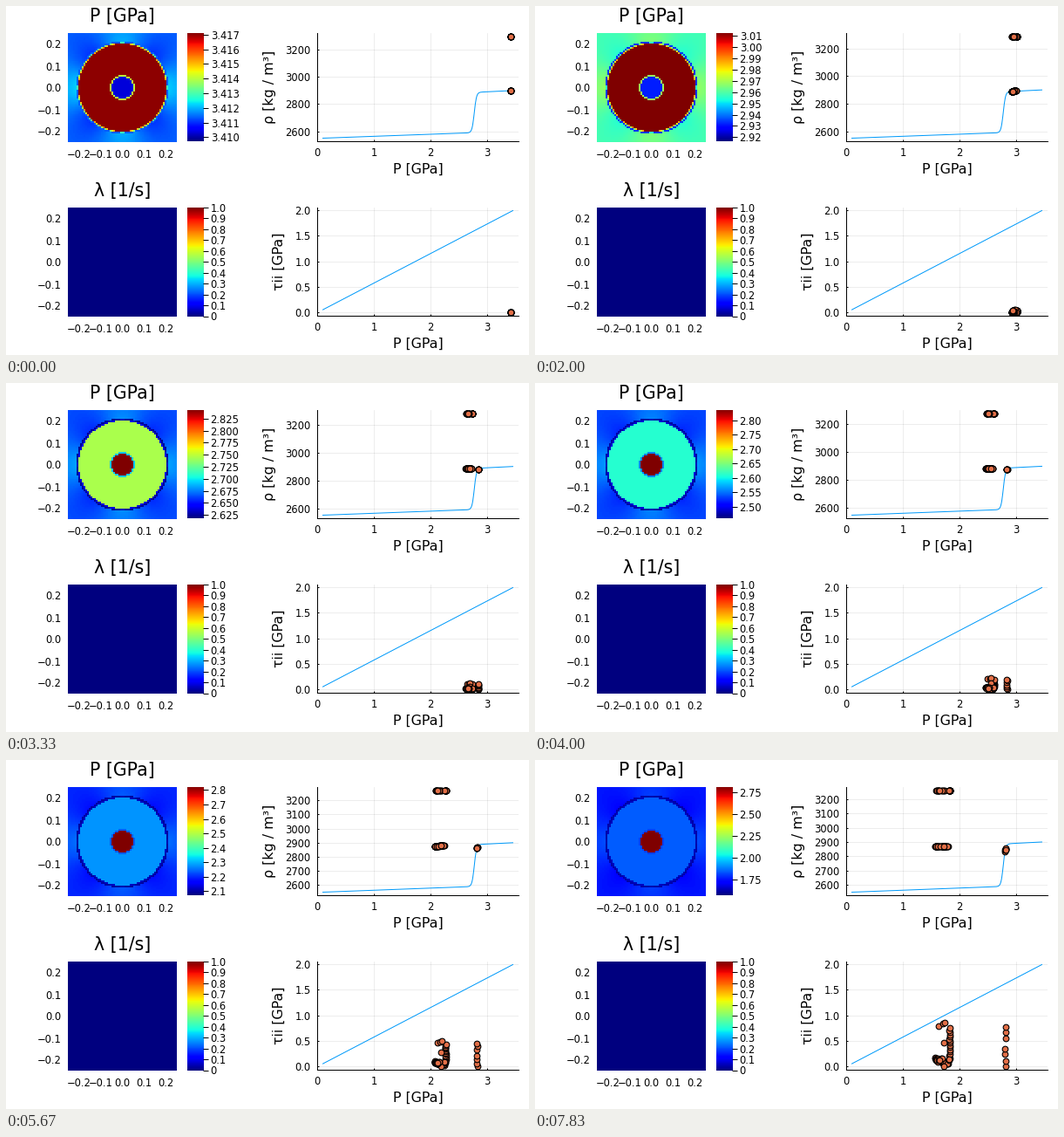
A matplotlib script for the animation above (8 s loop, 600 by 400 pixels).

```python
import numpy as np
import matplotlib.pyplot as plt
from matplotlib.animation import FuncAnimation

W, H, DPI = 600, 400, 100
STEPS, LOOP, INTERVAL = 48, 8000, 50
PX = 72 / DPI                      # points per pixel
TICK, GUIDE, TITLE = 8.3, 11.45, 14.8
BLUE, ORANGE = "#009afa", "#e36f47"

plt.rcParams["font.family"] = "DejaVu Sans"
fig = plt.figure(figsize=(W / DPI, H / DPI), dpi=DPI, facecolor="white")

# Pressure history in GPa at a few key steps
KEYS = [0, 5, 12, 20, 28, 34, 47]
FLOOR = [3.4097, 3.205, 2.916, 2.617, 2.300, 2.067, 1.565]
MATRIX = [3.4115, 3.222, 2.960, 2.667, 2.411, 2.203, 1.764]
HALO = [3.4113, 3.213, 2.933, 2.622, 2.320, 2.090, 1.610]
INNER_RIM = [3.4140, 3.2303, 2.968, 2.690, 2.420, 2.230, 1.800]
STRESS = [0, 0.012, 0.055, 0.12, 0.33, 0.50, 0.86]
CORE_KEYS = [0, 5, 12, 14, 20, 28, 34, 47]
CORE = [3.4103, 3.2115, 2.931, 2.856, 2.843, 2.828, 2.821, 2.810]


def at(i, values):
    return np.interp(i, KEYS, values)


def shell_pressure(i):
    return 3.417 - 0.0337 * i


def transition(p):
    low = 2550 + 15 * (p - 0.1)
    high = 2900 - 20 * (3.45 - p)
    return low + (high - low) * 0.5 * (1 + np.tanh((p - 2.77) / 0.04))


def label(v, digits):
    return f"{v:.{digits}f}".replace("-", "\u2212")


def add_axes(x, y, w, h, shown=()):
    ax = fig.add_axes([x / W, 1 - (y + h) / H, w / W, h / H])
    for side, spine in ax.spines.items():
        spine.set_visible(side in shown)
        spine.set_linewidth(PX)
    return ax


def add_text(x, y, s, size, **kw):
    fig.text(x / W, 1 - y / H, s, fontsize=size, ha="center", **kw)


def add_map(y, title):
    ax = add_axes(71, y, 125, 125)
    im = ax.imshow(np.zeros((62, 62)), cmap="jet", vmin=0, vmax=1,
                   extent=(-0.25, 0.25, -0.25, 0.25), aspect="auto",
                   origin="lower", interpolation="nearest")
    ticks = [-0.2, -0.1, 0, 0.1, 0.2]
    names = [label(t, 1) for t in ticks]
    ax.set_xticks(ticks, names)
    ax.set_yticks(ticks, names)
    ax.tick_params(length=0, pad=5.4, labelsize=TICK)
    add_text(133.5, y - 12.6, title, TITLE, va="baseline")
    return im


def add_bar(y):
    ax = add_axes(208, y, 18, 124.5)
    ax.imshow(np.linspace(0, 1, 256)[:, None], cmap="jet", aspect="auto",
              origin="lower", extent=(0, 1, 0, 1))
    ax.set_xticks([])
    ax.yaxis.tick_right()
    ax.tick_params(axis="y", length=4.4, width=PX, pad=1.8, labelsize=TICK)
    return ax


def add_plot(y, name, name_x):
    ax = add_axes(357, y, 231, 124, ("left", "bottom"))
    ax.set_xlim(-0.0005, 3.5505)
    ax.set_xticks(range(4))
    ax.grid(color="black", alpha=0.1, lw=0.5)
    ax.set_axisbelow(True)
    ax.tick_params(direction="in", length=1.6, width=PX, pad=5.3, labelsize=TICK)
    add_text(472.5, y + 161, "P [GPa]", GUIDE, va="baseline")
    add_text(name_x, y + 62, name, GUIDE, va="center", rotation=90)
    return ax


def add_dots(ax):
    dots, = ax.plot([], [], "o", ms=4.8, mfc=ORANGE, mec="black", mew=0.8,
                    clip_on=False, zorder=6)
    return dots


p_map = add_map(31, "P [GPa]")
p_bar = add_bar(31)
add_map(231, "\u03bb [1/s]")
rate_bar = add_bar(231)
rate_bar.set_yticks(np.arange(11) / 10,
                    ["0"] + [label(k / 10, 1) for k in range(1, 11)])

rho_ax = add_plot(31, "\u03c1 [kg / m\u00b3]", 303)
tau_ax = add_plot(231, "\u03c4ii [GPa]", 313.5)
p_line = np.linspace(0.1, 3.45, 400)
rho_ax.plot(p_line, transition(p_line), color=BLUE, lw=PX)
tau_ax.plot(p_line, 0.5774 * p_line, color=BLUE, lw=PX)
tau_ax.set_ylim(-0.0598, 2.0517)
tau_ax.set_yticks(np.arange(5) / 2, [label(k / 2, 1) for k in range(5)])
rho_dots, tau_dots = add_dots(rho_ax), add_dots(tau_ax)

# Sample points: depth below the shell pressure, and share of peak stress
rng = np.random.default_rng(4)
shell_depth = np.concatenate([
    rng.uniform(0, 0.05, 16),
    [0.75, 0.5, 0.37, 0.4, 0.1],
    rng.uniform(0.5, 0.92, 9)])
shell_share = np.concatenate([
    np.linspace(0.14, 0.88, 16),
    [0.92, 0.97, 1, 0.55, 0.17],
    rng.uniform(0.08, 0.2, 9)])
matrix_depth = np.append(rng.uniform(0.12, 1, 40), 0.42)
matrix_share = np.append(
    0.04 + 0.13 * matrix_depth[:-1] + rng.uniform(-0.02, 0.05, 40), 0)
core_share = np.array([0, 0.12, 0.28, 0.41, 0.65, 0.79, 0.907])
core_shift = rng.uniform(-0.009, 0.003, core_share.size)

c = (np.arange(62) + 0.5) / 62 * 0.5 - 0.25
gx, gy = np.meshgrid(c, c)
radius = np.hypot(gx, gy)
angle = np.arctan2(gy, gx)
swell = (0.2 / radius) ** 2 * (1.4 * np.cos(4 * angle) + 0.3 * np.cos(2 * angle))


def pressure_field(i, span):
    shell, halo = shell_pressure(i), at(i, HALO)
    mix = np.interp(i, [12, 20], [0.5, 0.1])
    blend = mix * (1.5 - (radius - 0.2) / 0.006)
    outside = at(i, MATRIX) + (0.055 - 0.0006 * i) * span * swell
    return np.select(
        [radius < 0.047, radius < 0.055, radius < 0.2,
         radius < 0.206, radius < 0.212],
        [np.interp(i, CORE_KEYS, CORE), at(i, INNER_RIM), shell,
         halo + blend * (shell - halo), halo],
        outside)


def bar_ticks(lo, hi):
    for power in range(-4, 1):
        for base in (1, 2.5, 5):
            step = base * 10.0 ** power
            if (hi - lo) / step <= 10.3:
                ticks = np.arange(np.ceil(lo / step), np.floor(hi / step) + 1) * step
                digits = max(0, -power + (base == 2.5))
                return ticks, [label(t, digits) for t in ticks]


def update(frame):
    # Simulation step reached by the end of this short display interval
    i = int((frame * INTERVAL + 44) * STEPS / LOOP)
    shell = shell_pressure(i)
    core = np.interp(i, CORE_KEYS, CORE)
    lo, hi = at(i, FLOOR), max(shell, core) + 0.0001
    p_map.set_data(pressure_field(i, hi - lo))
    p_map.set_clim(lo, hi)
    ticks, names = bar_ticks(lo, hi)
    p_bar.set_yticks((ticks - lo) / (hi - lo), names)
    p_bar.set_ylim(0, 1)

    depth, peak = shell - lo, at(i, STRESS)
    p_shell = shell - depth * shell_depth
    p_matrix = shell - depth * matrix_depth
    p_core = core + core_shift * peak / 0.86
    p = np.concatenate([p_matrix, p_shell, p_core])
    rho = np.concatenate([2900 - 18 * (3.417 - p_matrix),
                          3300 - 24 * (3.417 - p_shell),
                          transition(p_core)])
    share = np.concatenate([matrix_share, shell_share, core_share])
    rho_dots.set_data(p, rho)
    tau_dots.set_data(p, peak * share)

    top = 3300 - 24 * (3.417 - shell)
    pad = 0.03 * (top - 2550)
    step = 200 if top + pad > 3301 else 100
    marks = np.arange(2600, top + pad, step)
    rho_ax.set_yticks(marks, [label(m, 0) for m in marks])
    rho_ax.set_ylim(2550 - pad, top + pad)
    return p_map, rho_dots, tau_dots


anim = FuncAnimation(fig, update, frames=LOOP // INTERVAL, interval=INTERVAL,
                     repeat=True, repeat_delay=0, blit=False)
plt.show()
```
